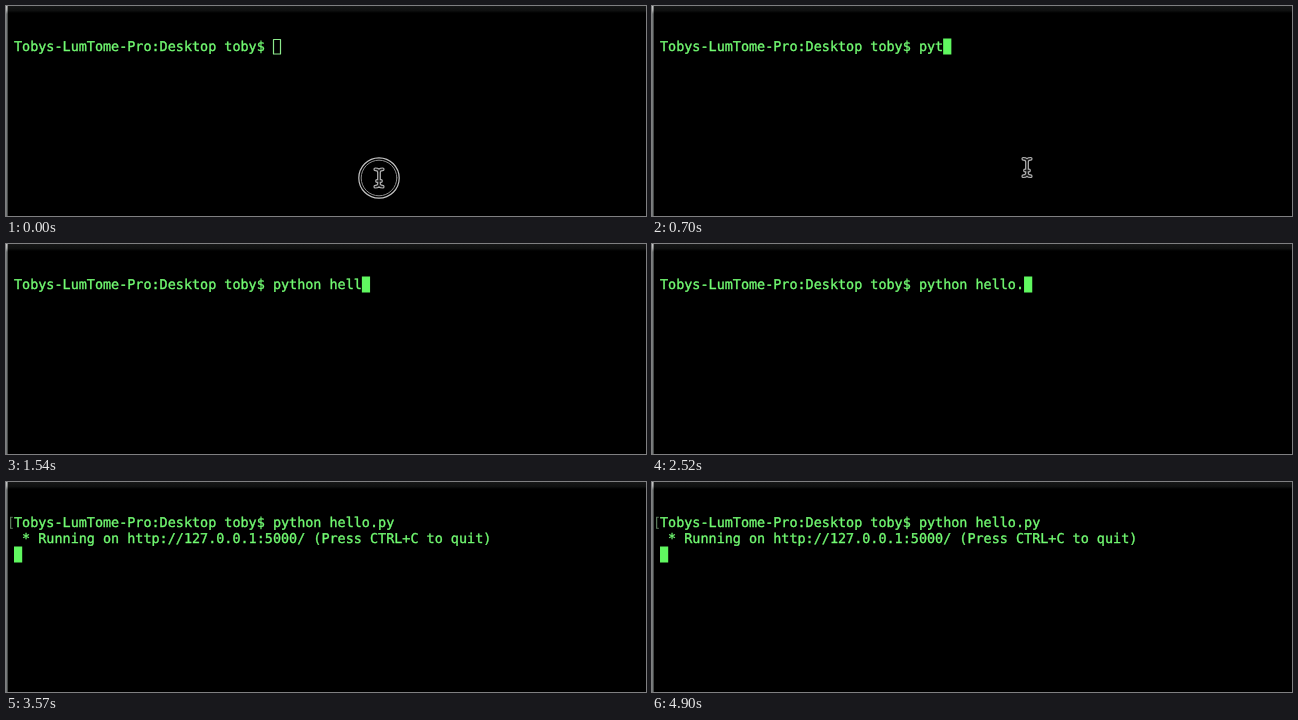
These frames come from a looping animation (640 px wide and 210 px high, 5.04 s). An HTML page with a canvas:

```html
<!DOCTYPE html>
<html lang="en">
<head>
<meta charset="utf-8">
<title>Terminal</title>
<style>
  html, body { margin: 0; width: 100%; height: 100%; overflow: hidden; background: #000; }
  #stage { position: relative; width: 640px; height: 210px; overflow: hidden; background: #000; }
  canvas { position: absolute; left: 0; top: 0; }
  .line {
    position: absolute; left: 8px; white-space: pre;
    font: 13.44px/16px "DejaVu Sans Mono", monospace;
    text-rendering: geometricPrecision;
    color: #72fb72;
    -webkit-text-stroke: 0.35px #72fb72;
  }
  #mark { left: 1px; color: #5c7c5c; -webkit-text-stroke: 0; }
</style>
</head>
<body>
<div id="stage">
  <canvas id="view" width="640" height="210"></canvas>
  <div class="line" id="mark" style="top:34px"></div>
  <div class="line" id="command" style="top:34px"></div>
  <div class="line" id="output" style="top:50px"></div>
</div>
<script>
const LOOP = 5040, STEP = 70;
const CELL = 8.09, LEFT = 8, TOP = 32.5, ROW = 16;
const PROMPT = "Tobys-LumTome-Pro:Desktop toby$ ";
const COMMAND = "python hello.py";
const OUTPUT = " * Running on http://127.0.0.1:5000/ (Press CTRL+C to quit)";
// Time at which each character of the command appears
const KEYS = [560, 630, 700, 840, 910, 980, 1120, 1190, 1330, 1400, 1540, 1610, 1750, 2590, 2800];
const FOCUS = 420, RING_END = 490, POINTER_END = 1400, ENTER = 3010, REPLY = 3570;
// Pointer path: time, x, y
const PATH = [
  [0, 373, 172], [210, 373, 187], [350, 373, 187], [560, 375, 170],
  [700, 375, 161.5], [840, 375, 163], [980, 375, 166.5], [1190, 375, 168]
];

const byId = id => document.getElementById(id);
const ctx = byId("view").getContext("2d");

function pointerAt(t) {
  const i = PATH.findIndex(p => p[0] > t);
  if (i < 0) return PATH[PATH.length - 1].slice(1);
  const [a, b] = [PATH[i - 1], PATH[i]];
  const u = (t - a[0]) / (b[0] - a[0]);
  const k = u * u * (3 - 2 * u);
  return [a[1] + (b[1] - a[1]) * k, a[2] + (b[2] - a[2]) * k];
}

function drawWindow() {
  ctx.fillStyle = "#000";
  ctx.fillRect(0, 0, 640, 210);
  const bar = ctx.createLinearGradient(0, 0, 0, 7);
  bar.addColorStop(0, "#161717");
  bar.addColorStop(0.65, "#0f1010");
  bar.addColorStop(1, "#000");
  ctx.fillStyle = bar;
  ctx.fillRect(0, 0, 640, 7);
  const edge = ctx.createLinearGradient(0, 0, 0, 8);
  edge.addColorStop(0, "#c8caca");
  edge.addColorStop(0.5, "#b4b6b6");
  edge.addColorStop(1, "#747878");
  ctx.fillStyle = edge;
  ctx.fillRect(0, 0, 1.6, 210);
}

function drawCaret(col, row, solid) {
  const x = LEFT + col * CELL, y = TOP + row * ROW;
  if (solid) {
    ctx.fillStyle = "#60f860";
    ctx.fillRect(x, y, 8.2, 16);
  } else {
    ctx.strokeStyle = "#8ce88c";
    ctx.lineWidth = 1.2;
    ctx.strokeRect(Math.round(x) + 0.5, y + 1, 7, 14.5);
  }
}

function ring(x, y, r, width, color) {
  ctx.beginPath();
  ctx.arc(x, y, r, 0, Math.PI * 2);
  ctx.lineWidth = width;
  ctx.strokeStyle = color;
  ctx.stroke();
}

function drawBeam(x, y) {
  ctx.beginPath();
  for (const v of [-1, 1]) {
    ctx.moveTo(x - 3.7, y + v * 8.7);
    ctx.quadraticCurveTo(x, y + v * 8.7, x, y + v * 5.5);
    ctx.quadraticCurveTo(x, y + v * 8.7, x + 3.7, y + v * 8.7);
  }
  ctx.moveTo(x, y - 6);
  ctx.lineTo(x, y + 6);
  ctx.moveTo(x - 2, y + 3);
  ctx.lineTo(x + 2, y + 3);
  ctx.lineCap = "round";
  ctx.lineJoin = "round";
  for (const [width, color] of [[3.8, "#b4b4b4"], [1.5, "#181818"]]) {
    ctx.lineWidth = width;
    ctx.strokeStyle = color;
    ctx.stroke();
  }
}

function setText(id, text) {
  const el = byId(id);
  if (el.textContent !== text) el.textContent = text;
}

function render(t) {
  const typed = KEYS.filter(k => k <= t).length;
  setText("command", PROMPT + COMMAND.slice(0, typed));
  setText("mark", t >= ENTER ? "[" : "");
  setText("output", t >= REPLY ? OUTPUT : "");

  drawWindow();
  if (t >= REPLY) drawCaret(0, 2, true);
  else if (t >= ENTER) drawCaret(0, 1, true);
  else drawCaret(PROMPT.length + typed, 0, t >= FOCUS);

  if (t < POINTER_END) {
    const [x, y] = pointerAt(t);
    if (t < RING_END) {
      ring(x, y, 20.2, 1.2, "#c4c4c4");
      ring(x, y, 17.8, 1, "#8c8c8c");
    }
    drawBeam(x, y);
  }
}

const start = performance.now();
function tick() {
  const t = (performance.now() - start) % LOOP;
  render(Math.floor(t / STEP) * STEP);
  requestAnimationFrame(tick);
}
render(0);
requestAnimationFrame(tick);
</script>
</body>
</html>
```
